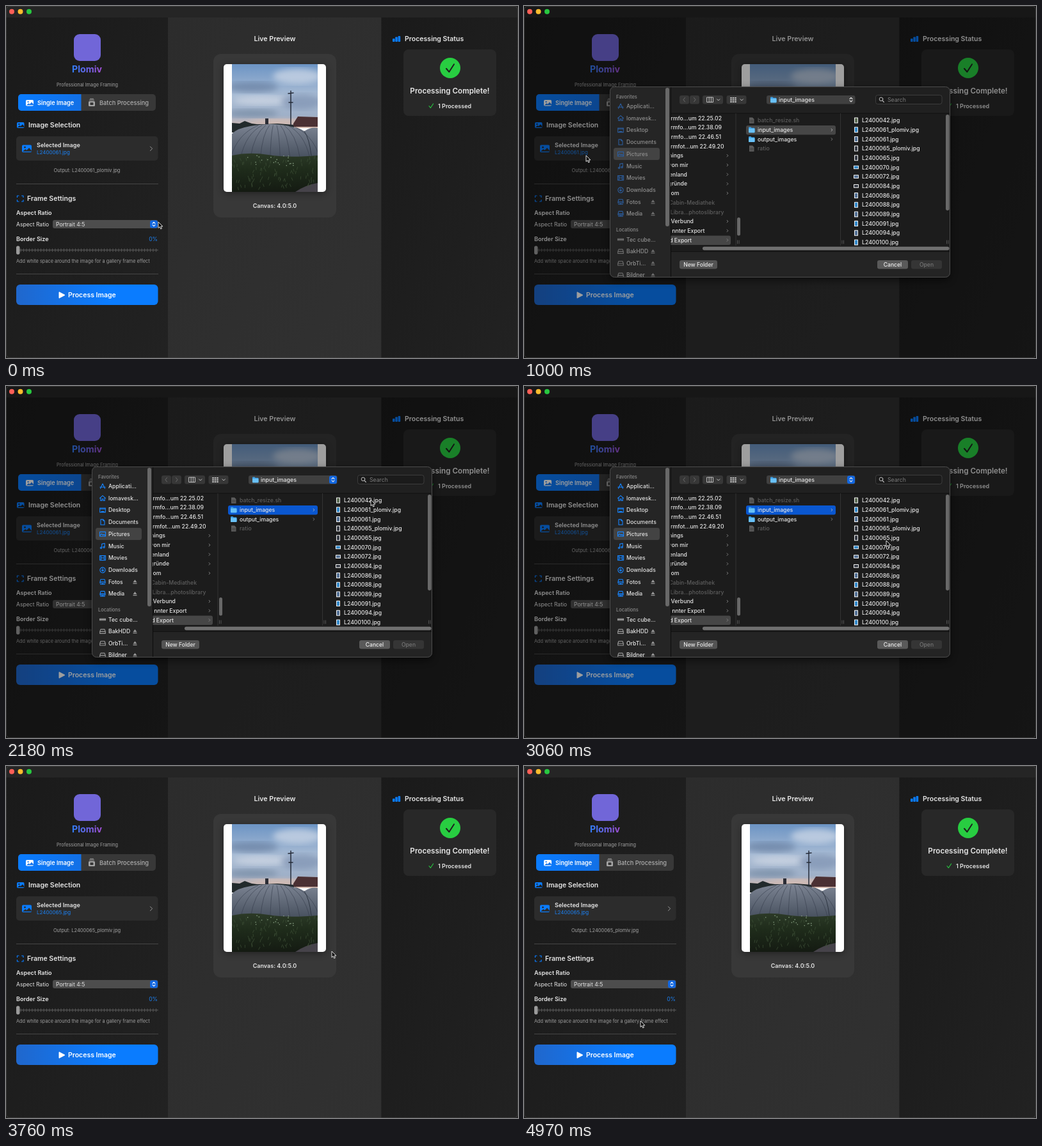
Animation, 800 px wide and 551 px high, one loop 5 s. Source, as an HTML page:

```html
<!DOCTYPE html>
<html lang="en">
<head>
<meta charset="utf-8">
<title>Image framing app</title>
<style>
html, body { margin: 0; width: 100%; height: 100%; overflow: hidden; background: #1c1c1c; }
svg { display: block; width: 800px; height: 551px; font-family: Inter, "Open Sans", sans-serif; }
text { fill: #e6e6e6; white-space: pre; }
.m { text-anchor: middle; }
.e { text-anchor: end; }
.b { font-weight: 700; }
.s { font-weight: 600; }
.d { font-weight: 500; }
.line { fill: none; stroke-linecap: round; stroke-linejoin: round; }
#sheet { --label: #e4e4e4; --icon: #1684ff; --gray: #9a9a9a; --row: #0a57d0; --pop: #1267e0; }
#sheet.idle { --label: #8f8f8f; --icon: #2b5c9c; --gray: #6c6c6c; --row: #464646; --pop: #404040; }
.label { fill: var(--label); }
</style>
</head>
<body>
<svg id="stage" viewBox="0 0 800 551"></svg>
<script>
const LOOP = 5000;
const BLUE = '#0a7cff';

const text = (x, y, str, size, cls = '', attr = '') =>
  `<text x="${x}" y="${(y + size * 0.36).toFixed(2)}" font-size="${size}" class="${cls}" ${attr}>${str}</text>`;
const rect = (x, y, w, h, r, fill, attr = '') =>
  `<rect x="${x}" y="${y}" width="${w}" height="${h}" rx="${r}" fill="${fill}" ${attr}/>`;
const fill = (d, color, attr = '') => `<path d="${d}" fill="${color}" ${attr}/>`;
const line = (d, color, w = 1, attr = '') =>
  `<path class="line" d="${d}" stroke="${color}" stroke-width="${w}" ${attr}/>`;
const at = (x, y, body) => `<g transform="translate(${x} ${y})">${body}</g>`;
const chevron = (x, y, color, k = 1) => line(`M${x - k} ${y - 2 * k}l${2 * k} ${2 * k}l${-2 * k} ${2 * k}`, color, 0.9);
const updown = (x, y, color) =>
  line(`M${x - 2} ${y - 1.2}l2 -2 2 2M${x - 2} ${y + 1.2}l2 2 2 -2`, color, 1.1);
const gradient = (id, stops, dir = 'x2="1" y2="0"') =>
  `<linearGradient id="${id}" x1="0" y1="0" ${dir}>` +
  stops.map(([o, c]) => `<stop offset="${o}" stop-color="${c}"/>`).join('') + '</linearGradient>';

function picture(x, y, w, h, color, hole) {
  return rect(x, y, w, h, 1.8, color) +
    `<circle cx="${x + w * 0.3}" cy="${y + h * 0.32}" r="${h * 0.12}" fill="${hole}"/>` +
    fill(`M${x + 1} ${y + h - 1.2}l${w * 0.28} ${-h * 0.32} ${w * 0.14} ${h * 0.15} ${w * 0.25} ${-h * 0.34} ${w * 0.25} ${h * 0.36}v${h * 0.15}z`, hole);
}

const defs = '<defs>' +
  gradient('side', [[0, '#1a1a1a'], [1, '#222222']], 'x2="1" y2="1"') +
  gradient('mid', [[0, '#2c2c2c'], [1, '#313131']], 'x2="1" y2="1"') +
  gradient('btn', [[0, '#2067cc'], [0.65, BLUE], [1, BLUE]]) +
  gradient('tab', [[0, '#0a7cff'], [1, '#1270e6']]) +
  gradient('brand', [[0, '#2f7df6'], [0.55, '#6d62e8'], [1, '#a24fd0']]) +
  gradient('sky', [[0, '#6c94c4'], [0.25, '#8ba8cc'], [0.5, '#a9bcd4'], [0.8, '#9fb0c8'], [1, '#d8b9ac']], 'x2="0" y2="1"') +
  gradient('dome', [[0, '#7c8493'], [1, '#454e5c']], 'x2="0" y2="1"') +
  gradient('grass', [[0, '#2c3a27'], [0.4, '#1f2c1b'], [1, '#141a12']], 'x2="0" y2="1"') +
  '<filter id="soft"><feGaussianBlur stdDeviation="5"/></filter>' +
  '<filter id="drop" x="-20%" y="-20%" width="140%" height="140%"><feGaussianBlur stdDeviation="6"/></filter>' +
  '<clipPath id="photo"><rect x="353" y="91" width="134" height="200"/></clipPath>' +
  '<clipPath id="panel"><rect x="134" y="126" width="532" height="298.5" rx="7"/></clipPath>' +
  '<clipPath id="col"><rect x="229.5" y="168" width="101" height="208"/></clipPath>' +
  '<clipPath id="files"><rect x="495" y="168" width="163" height="207"/></clipPath>' +
  '</defs>';

function photo() {
  const cloud = (x, y, rx, ry, c, o) =>
    `<ellipse cx="${x}" cy="${y}" rx="${rx}" ry="${ry}" fill="${c}" opacity="${o}" filter="url(#soft)"/>`;
  let folds = '';
  for (let x = 362; x < 487; x += 13) folds += `M${420 + (x - 420) * 0.45} 187Q${x} 200 ${x + (x - 420) * 0.18} 236`;
  let seed = 7, tufts = '', blooms = '';
  const rnd = () => (seed = seed * 16807 % 2147483647) / 2147483647;
  for (let i = 0; i < 90; i++) {
    const x = 353 + rnd() * 134, y = 238 + rnd() * 50;
    tufts += `M${x.toFixed(1)} ${y.toFixed(1)}l${(rnd() * 4 - 2).toFixed(1)} -4`;
  }
  for (let i = 0; i < 22; i++)
    blooms += `<circle cx="${(358 + rnd() * 95).toFixed(1)}" cy="${(233 + rnd() * 17).toFixed(1)}" r=".8" fill="#8ba486"/>`;
  return '<g clip-path="url(#photo)">' +
    rect(353, 91, 134, 100, 0, 'url(#sky)') +
    cloud(385, 127, 40, 8, '#5f7698', 0.6) + cloud(455, 110, 38, 12, '#c6d3e4', 0.8) +
    cloud(400, 148, 45, 7, '#d3dae6', 0.7) + cloud(462, 150, 32, 12, '#7f93b2', 0.7) +
    cloud(385, 168, 40, 6, '#71869f', 0.7) + cloud(425, 180, 45, 3, '#e8c4b0', 0.8) +
    fill('M353 183l12 1 8-4 11 4 8 1 12 0 20-1 26 2v12H353z', '#222a2c') +
    fill('M449 184l7-11 31 1v15h-38z', '#4b3033') + rect(405, 176, 5, 10, 0, '#2b2c35') +
    line('M445 133V186M441 137l8-1M442 151h6', '#252b38', 1.5) +
    fill('M353 236V200Q362 191 382 188Q420 181 450 190Q459 191 466 196Q477 189 487 191V240z', 'url(#dome)') +
    line(folds, '#333b48', 0.8, 'opacity=".7"') + line('M466 196Q474 207 477 234', '#2d3541', 1) +
    fill('M353 234Q380 228 410 233T487 234V291H353z', 'url(#grass)') +
    fill('M452 291Q468 280 487 277V291z', '#46434a') +
    line(tufts, '#405238', 0.7) + blooms + '</g>';
}

function app() {
  let ticks = '';
  for (let x = 23; x < 238; x += 4.5) ticks += `M${x} 380v4.4`;
  const rule = y => rect(16, y, 222, 1, 0, '#464646');
  return rect(0, 0, 800, 551, 0, '#252525') +
    rect(0, 18, 253, 533, 0, 'url(#side)') + rect(253, 18, 333.5, 533, 0, 'url(#mid)') +
    rect(586.5, 18, 213.5, 533, 0, 'url(#side)') +

    rect(106, 44, 42, 42, 9, '#7166d8') +
    text(126.5, 99, 'Plomiv', 14.2, 'm b', 'style="fill:url(#brand)"') +
    text(127, 123, 'Professional Image Framing', 7.35, 'm', 'style="fill:#a2a2a2"') +

    rect(19, 138, 215, 26, 5, '#383838') +
    fill('M24 138H117.500V164H24a5 5 0 0 1-5-5V143a5 5 0 0 1 5-5z', 'url(#tab)') +
    picture(31, 147, 12, 9.5, '#fff', '#1476ee') + text(49, 151.5, 'Single Image', 9.2, 's', 'style="fill:#fff"') +
    rect(129, 149, 10, 8, 1.5, '#a6a6a6') + line('M130.500 147.300h7M131.500 145.300h5', '#a6a6a6', 1) +
    rect(131.5, 151, 5, 4, 0.8, '#383838') + text(146, 151.5, 'Batch Processing', 9.25, 'd', 'style="fill:#b0b0b0"') +

    picture(17, 182, 11.5, 9, BLUE, '#1c1c1c') + text(35, 186.5, 'Image Selection', 10.5, 's') +
    rect(16, 204, 221.5, 38, 5, '#2c2c2c') + picture(25, 217.5, 15, 11.5, BLUE, '#2c2c2c') +
    text(48, 217.5, 'Selected Image', 9.1, 's') +
    text(48, 229.5, '', 8, '', 'id="name" style="fill:#1c82f5"') + chevron(227, 223.3, '#a5a5a5', 1.6) +
    text(126.5, 257.5, '', 7.5, 'm', 'id="output" style="fill:#a4a4a4"') + rule(278) +

    line('M17.500 299.500v-2.500h2.500M24.500 297h2.500v2.500M27 303.500v2.500h-2.500M20 306h-2.500v-2.500', BLUE, 1.2) +
    text(33, 301, 'Frame Settings', 10.5, 's') +
    text(16, 324, 'Aspect Ratio', 9.1, 's') + text(16, 342, 'Aspect Ratio', 8.6) +
    rect(73, 335, 164.500, 13, 3, '#4d4d4d') + text(78, 341.5, 'Portrait 4:5', 8.6) +
    rect(225, 335.5, 12, 12, 3, '#1267e0') + updown(231, 341.5, '#fff') +
    text(16, 365, 'Border Size', 9.1, 's') + text(237, 365, '0%', 8.6, 'e', 'style="fill:#1c82f5"') +
    rect(18, 381, 220, 2.200, 1, '#3f3f3f') + line(ticks, '#565656', 1) + rect(16, 375.5, 5.5, 13.5, 2.7, '#9a9a9a') +
    text(16, 399, 'Add white space around the image for a gallery frame effect', 7.35, '', 'style="fill:#9d9d9d"') + rule(419) +
    rect(16, 436, 221.5, 32, 6, 'url(#btn)') + fill('M83 447.800v9.400l9-4.700z', '#fff', 'stroke="#fff" stroke-linejoin="round"') +
    text(97, 452.5, 'Process Image', 10.5, 's', 'style="fill:#fff"') +

    text(420, 51.5, 'Live Preview', 10.7, 'm s') + rect(324, 75, 192, 256, 12, '#383838') +
    rect(340, 93, 160, 200, 5, '#000', 'opacity=".4" filter="url(#drop)"') +
    rect(340, 91, 160, 200, 5, '#fff') + photo() + text(420, 313, 'Canvas: 4.0:5.0', 9, 'm s') +

    rect(604, 51, 3.6, 5, 0.8, BLUE) + rect(608.3, 48.5, 3.6, 7.5, 0.8, BLUE) + rect(612.600, 47, 3.6, 9, 0.8, BLUE) +
    text(623, 51, 'Processing Status', 10.55, 's') + rect(621, 68, 145, 104, 8, '#282828') +
    `<circle cx="694" cy="97" r="16" fill="#28cd41"/>` + line('M688 98l4.300 5.200 7.700-12', '#1e1e1e', 2) +
    text(693.5, 132.5, 'Processing Complete!', 11.7, 'm s') +
    line('M661 156.500l2.300 3 4.300-6.500', '#28cd41', 1.1) + text(675, 156.5, '1 Processed', 9, 's');
}

const ICONS = {
  apps: 'M-3.500 3.500L0-4 3.500 3.500M-4.200 1.200H4.200',
  home: 'M-4.500 0L0-4 4.500 0M-3.200-1V3.800H-1V1H1V3.800H3.200V-1',
  desk: 'M-4.300-3.300H4.300V3.300H-4.300ZM-4-1.800H4M-2 2H2',
  doc: 'M-3-4.200H.8L3-2V4.200H-3ZM.8-4.200V-2H3',
  pics: 'M-4.500-3.300H4.500V3.500H-4.500ZM-4.300 2.500L-1.500-.3 .5 1.800 2 .5 4.300 2.600',
  music: 'M-1.300 3V-3L3.200-4.200V2M-1.300 3a1.200 1 0 1 1-.1-.4M3.200 2a1.200 1 0 1 1-.1-.4',
  film: 'M-4.500-3.500H4.500V3.500H-4.500ZM-2.600-3.500V3.500M2.600-3.500V3.500M-2.600 0H2.600',
  down: 'M4.200 0a4.200 4.200 0 1 1-.01-.1M0-2.200V2M-1.800 .4L0 2.200 1.800 .4',
  net: 'M-4 0L-3-3.700H3L4 0V2H-4ZM-4 0H4M0 2V4M-3.500 4H3.500',
  disk: 'M-4.300 .3L-3-3.200H3L4.300 .3V3.300H-4.300ZM-4.300 .3H4.300',
  box: 'M-4.500-1.300H4.500V1.300H-4.500ZM-4 0H4',
};
const PLACES = [
  ['apps', 'Applicati…'], ['home', 'lomavesk…'], ['desk', 'Desktop'], ['doc', 'Documents'], ['pics', 'Pictures'],
  ['music', 'Music'], ['film', 'Movies'], ['down', 'Downloads'], ['net', 'Fotos', 1], ['net', 'Media', 1],
];
const DRIVES = [['box', 'Tec cube…'], ['disk', 'BakHDD', 1], ['disk', 'OrbTi…', 1], ['disk', 'Bildner', 1]];
// label, right edge, kind: 0 file, 1 folder, 2 dimmed
const FOLDERS = [
  ['Bildschirmfo…um 22.25.02', 309, 0], ['Bildschirmfo…um 22.38.09', 309, 0],
  ['Bildschirmfo…um 22.46.51', 308, 0], ['Bildschirmfot…um 22.49.20', 312.500, 0],
  ['nings', 249, 1], ['von mir', 256.5, 1], ['enland', 255, 1], ['gründe', 255, 1], ['om', 242.500, 1],
  ['Cabin-Mediathek', 298, 2], ['Libra…photoslibrary', 312.500, 2],
  ['tVerbund', 265, 1], ['nnter Export', 282.5, 1], ['d Export', 262, 1],
];
const FILES = ['42', '61_plomiv', '61', '65_plomiv', '65', '70', '72', '84', '86', '88', '89', '91', '94', '100'];

function place([icon, label, eject], y, color) {
  return at(151, y, line(ICONS[icon], color, 1.1)) + text(160, y, label, 8.6, 'label d') +
    (eject ? fill(`M198.500 ${y + 0.8}l3-4 3 4zM198.500 ${y + 2}h6v1.200h-6z`, 'var(--gray)') : '');
}
const folder = (x, y) =>
  fill(`M${x} ${y - 3.500}q0-1 1-1h2.500l1 1.200h4q1 0 1 1v5.500q0 1-1 1h-7.500q-1 0-1-1z`, '#3fa2e8') +
  rect(x, y - 2, 9.5, 6.200, 1, '#69c1f7');
const sheetDoc = (x, y) => fill(`M${x} ${y - 4.500}h5l2.500 2.500v6.800h-7.500z`, '#5c5c5c') +
  line(`M${x + 1.5} ${y}h4.500M${x + 1.5} ${y + 2}h4.500`, '#333', 0.7);

function thumb(i, y) {
  const wide = i > 4 && i < 8, w = wide ? 8 : 6, h = wide ? 5.6 : 9;
  const tone = ['#5a6a52', '#4f6d92', '#2f86c8', '#333842'][i < 1 ? 0 : i === 3 || i === 4 || i === 7 ? 3 : i % 2 + 1];
  return rect(519 - w / 2, y - h / 2, w, h, 0.5, '#f2f2f2') + rect(520 - w / 2, y - h / 2 + 1, w - 2, h - 2, 0, tone);
}

function dialog() {
  const pitch = 14.69;
  const button = (x, w, label, bg, color) =>
    rect(x, 398, w, 13.5, 3.200, bg) + text(x + w / 2, 404.8, label, 8.6, 'm d', `style="fill:${color}"`);
  const control = (x, w) => rect(x, 140, w, 13.500, 3.200, '#373737');
  const folders = FOLDERS.map(([label, edge, kind], i) => {
    const y = 175.5 + i * pitch;
    return text(edge, y, label, 8.7, 'e d', kind === 2 ? 'style="fill:#5e5e5e"' : '') +
      (kind === 1 ? chevron(318, y, '#8a8a8a', 0.9) : '');
  }).join('');
  const files = FILES.map((f, i) => {
    const y = 179 + i * pitch, n = f.length === 3 ? 'L2400' : 'L24000';
    return thumb(i, y) + text(528, y, n + f + '.jpg', 8.7, 'd');
  }).join('');
  const dim = 'style="fill:#5e5e5e"';
  const grip = x => line(`M${x} 367v5M${x + 2.5} 367v5`, '#6a6a6a', 0.7);

  return rect(134, 130, 532, 300, 9, '#000', 'opacity=".5" filter="url(#drop)"') +
    '<g clip-path="url(#panel)">' +
    rect(134, 126, 532, 299, 0, '#1c1c1c') + rect(229, 126, 437, 42, 0, '#202020') +
    rect(229, 384, 437, 41, 0, '#242424') + rect(134, 126, 95, 299, 0, '#252525') +
    rect(229, 126, 1, 299, 0, '#0c0c0c') + rect(230, 167.5, 436, 1, 0, '#111') + rect(230, 384, 436, 1, 0, '#111') +

    text(144, 142, 'Favorites', 7.4, 's', 'style="fill:#7d7d7d"') + rect(140, 222, 72, 19, 3.5, '#434343') +
    PLACES.map((p, i) => place(p, 157 + i * 18.68, 'var(--icon)')).join('') +
    text(144, 350, 'Locations', 7.4, 's', 'style="fill:#7d7d7d"') +
    DRIVES.map((p, i) => place(p, 365.5 + i * 18.6, 'var(--gray)')).join('') +
    rect(221, 128, 6, 217, 3, '#686868') +

    control(243, 15) + control(259, 15) + line('M251.500 143.500l-2.500 3.200 2.500 3.200M265.500 143.500l2.500 3.200-2.500 3.200', '#696969', 1) +
    control(279, 32) + line('M286 143h9.500v7.500h-9.500zM289.200 143v7.500M292.400 143v7.500M301.500 145.800l2.200 2.200 2.200-2.200', '#d0d0d0', 0.9) +
    control(316.5, 31) + line('M323 144h8M323 147h8M323 150h8', '#c4c4c4', 2, 'stroke-dasharray="1 2.500"') +
    line('M338 145.800l2.200 2.200 2.200-2.200', '#d0d0d0', 0.9) +
    rect(379, 140, 138.5, 13.500, 3.200, '#404040') + folder(385, 147) + text(398, 146.5, 'input_images', 8.8, 'd') +
    rect(505, 140.5, 12, 12.500, 3, 'var(--pop)') + updown(511, 146.7, '#e8e8e8') +
    rect(549.5, 139.5, 103.5, 14, 3.200, '#1b1b1b', 'stroke="#464646" stroke-width=".8"') +
    `<circle class="line" cx="558" cy="145.800" r="2.800" stroke="#bdbdbd"/>` + line('M560.200 148.200l2.200 2.300', '#bdbdbd', 1.1) +
    text(568, 147, 'Search', 8.7, '', 'style="fill:#7c7c7c"') +

    '<g clip-path="url(#col)">' + rect(222, 359.5, 101, 14.5, 3, '#464646') + folders + '</g>' +
    rect(330.5, 168, 1, 207, 0, '#333') + rect(494, 168, 1, 207, 0, '#333') +
    rect(333, 331, 5, 28.5, 2.5, '#686868') + grip(333.5) + grip(497) + grip(660.500) +
    sheetDoc(352, 179) + text(365, 179, 'batch_resize.sh', 8.7, 'd', dim) +
    rect(347, 187, 140, 14.500, 3, 'var(--row)') + folder(351, 194) + text(365, 193.7, 'input_images', 8.7, 'd') + chevron(481, 194, '#b5b5b5', 0.9) +
    folder(351, 208.700) + text(365, 208.4, 'output_images', 8.7, 'd') + chevron(481, 208.5, '#8a8a8a', 0.9) +
    sheetDoc(352, 223) + text(365, 223, 'ratio', 8.7, 'd', dim) +
    `<g clip-path="url(#files)">${files}</g>` +
    rect(659, 170, 5.5, 150, 2.7, '#686868') + rect(279, 376.800, 385.5, 5.500, 2.7, '#707070') +

    button(243, 59, 'New Folder', '#545454', '#e8e8e8') + button(552, 48, 'Cancel', '#5a5a5a', '#f0f0f0') +
    button(605, 48, 'Open', '#353535', '#757575') + '</g>' +
    rect(134.5, 126.5, 531, 298, 7, 'none', 'stroke="#4c4c4c"');
}

const lights = ['#ff5f57', '#febc2e', '#28c840']
  .map((c, i) => `<circle cx="${9 + i * 13.5}" cy="8.700" r="4" fill="${c}"/>`).join('');
const arrow = fill('M0 0V9.600L2.200 7.600 3.700 11 5.400 10.300 3.900 7H6.900Z', '#0a0a0a',
  'stroke="#f4f4f4" stroke-width=".9" stroke-linejoin="round"');

document.getElementById('stage').innerHTML = defs + app() +
  rect(0, 0, 800, 551, 0, '#000', 'id="shade"') + lights +
  rect(0.5, 0.5, 799, 550, 5, 'none', 'stroke="#505050" stroke-opacity=".55"') +
  `<g id="sheet">${dialog()}</g><g id="cursor">${arrow}</g>`;

const [shade, sheet, cursor, fileName, output] =
  ['shade', 'sheet', 'cursor', 'name', 'output'].map(id => document.getElementById(id));

// time, x, y of the pointer tip
const PATH = [
  [0, 238, 338], [680, 97, 234], [1150, 97, 234], [2000, 570, 178], [2200, 570, 178],
  [3000, 566, 242], [3420, 566, 242], [3760, 509, 290], [4420, 479, 318], [4970, 182, 399], [LOOP, 182, 399],
];
const clamp = v => Math.max(0, Math.min(1, v));
const smooth = v => v * v * (3 - 2 * v);

function draw(t) {
  const i = PATH.findIndex(([end]) => end > t);
  const [t0, x0, y0] = PATH[i - 1], [t1, x1, y1] = PATH[i];
  const k = smooth((t - t0) / (t1 - t0));
  cursor.setAttribute('transform', `translate(${x0 + (x1 - x0) * k} ${y0 + (y1 - y0) * k})`);

  const shown = clamp((t - 790) / 150) * (1 - clamp((t - 3470) / 130));
  shade.setAttribute('opacity', 0.38 * shown);
  sheet.setAttribute('opacity', shown);
  sheet.classList.toggle('idle', t < 1180);

  const base = t < 3480 ? 'L2400061' : 'L2400065';
  fileName.textContent = base + '.jpg';
  output.textContent = `Output: ${base}_plomiv.jpg`;
}

function tick() {
  draw(performance.now() % LOOP);
  requestAnimationFrame(tick);
}
tick();
</script>
</body>
</html>
```
